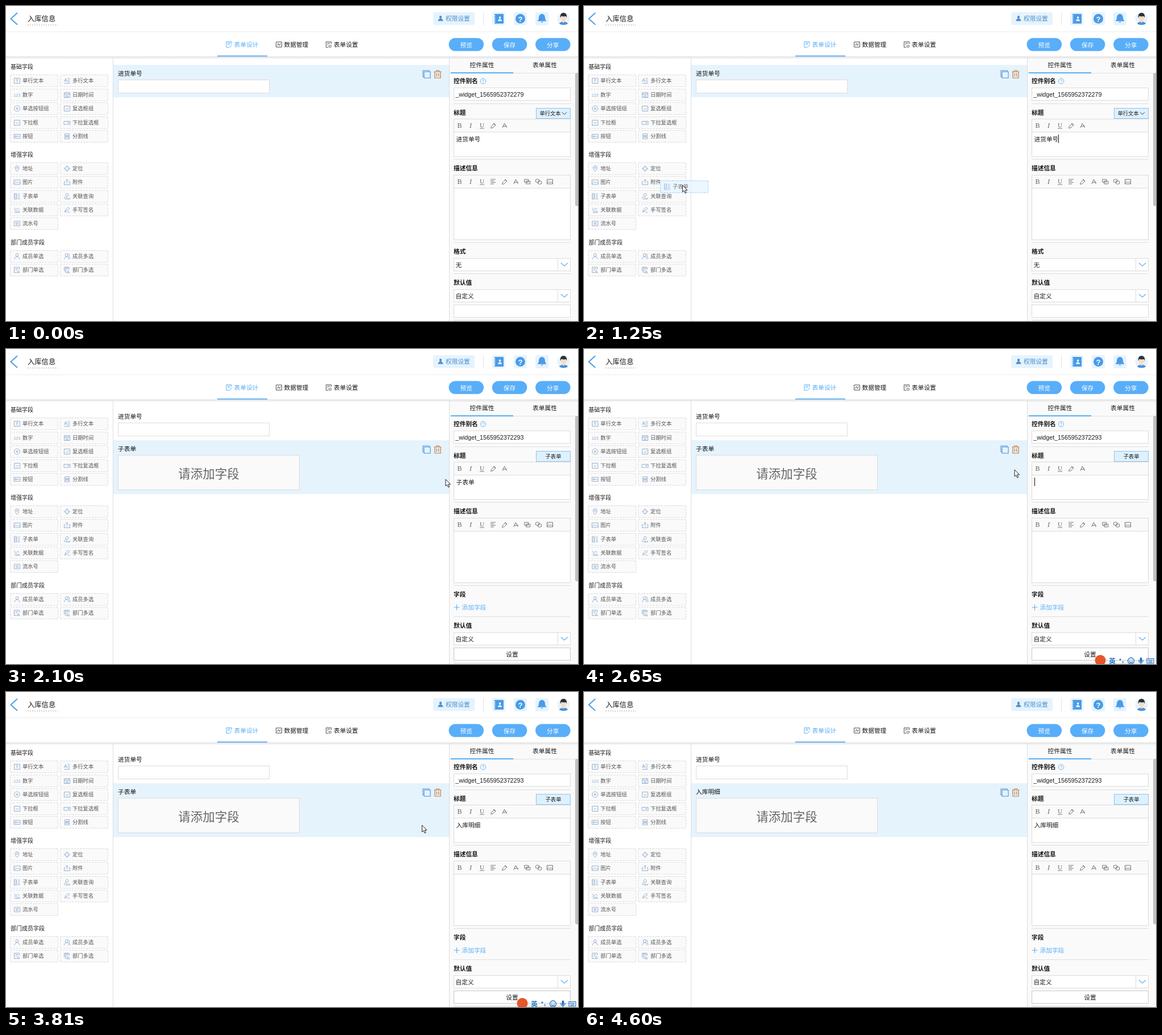
These frames come from a looping animation (1007x556 px, 5.08 s). An HTML page with a canvas:

```html
<!DOCTYPE html>
<html lang="zh-CN">
<head>
<meta charset="utf-8">
<title>表单设计</title>
<style>
html, body { margin: 0; width: 100%; height: 100%; overflow: hidden; background: #fff }
canvas { display: block }
</style>
</head>
<body>
<canvas id="stage" width="1007" height="556"></canvas>
<script>
const c = document.getElementById('stage').getContext('2d');
const LOOP = 5080, TICK = 77.8;
const SANS = '"Liberation Sans","Noto Sans CJK SC","Noto Sans CJK",sans-serif';
const SERIF = '"Liberation Serif",serif';
const BLUE = '#58aef8', PALE = '#e5f3fd', LINE = '#dcdcdc', ICON = '#8aa9cf', DARK = '#1a1a1a';

// Moments of the story, in ticks
const GRAB = 13, DROP = 22, SELECT = 30, TYPE = 34, BLUR = 52, LEAVE = 59;
const POINTER = [[1, 560, 420], [8, 54, 341], [10, 40, 334], [GRAB, 40, 334], [20, 379, 289], [21, 381, 288],
  [27, 774, 230], [SELECT, 828, 235], [33, 758, 213], [47, 758, 213], [54, 629, 324], [58, 602, 392]];

const GROUPS = [
  [107.5, '基础字段', [
    ['单行文本', 'M-5-4.5h10v9h-10zM-2-2h4M0-2v4.5'],
    ['多行文本', 'M-5 2l2.5-6 2.5 6M-4 0h3M1-4h4M1-1h4M1 2h4M-5 4.5h10'],
    ['数字', ''],
    ['日期时间', 'M-5-4h10v8.5h-10zM-5-1.5h10M-2.5-5v2M2.5-5v2M-3 1h6M-3 3h6'],
    ['单选按钮组', 'M-5 0a5 5 0 1 0 10 0a5 5 0 1 0-10 0M-1.5 0a1.5 1.5 0 1 0 3 0a1.5 1.5 0 1 0-3 0M-.5 0h1'],
    ['复选框组', 'M-5-4.5h10v9h-10zM-2.5 0l2 2 3.5-4'],
    ['下拉框', 'M-5-4.5h10v9h-10zM-2.5-1l2.5 2.5 2.5-2.5'],
    ['下拉复选框', 'M-5.5-2.5h11v5.5h-11zM1-.5l1.2 1.5 1.2-1.5z'],
    ['按钮', 'M-5.5-3.5h11v7h-11zM-3.5-1h2v2h-2zM-.5-1v2M1.5-1v2M3.5-1v2'],
    ['分割线', 'M-4-4.5h8v3h-8zM-5 0h10M-4 1.5h8v3h-8z']]],
  [262, '增强字段', [
    ['地址', 'M0 5c-5-5-4-10 0-10s5 5 0 10zM-1.3-1.5a1.3 1.3 0 1 0 2.6 0a1.3 1.3 0 1 0-2.6 0'],
    ['定位', 'M-3.5 0a3.5 3.5 0 1 0 7 0a3.5 3.5 0 1 0-7 0M-5.5 0h3M2.5 0h3M0-5.5v3M0 2.5v3M-.7 0h1.4'],
    ['图片', 'M-5.5-4h11v8h-11zM-5.5 3l3.5-3.5 2 2 2-2 3.5 3M-3-1.8h1'],
    ['附件', 'M-3-1h-2v5.5h10v-5.5h-2M0 2v-7M-2.5-2.5l2.5-2.5 2.5 2.5'],
    ['子表单', 'M-5-5h4v10h-4zM-4-2.5h2M-4 0h2M-4 2.5h2M1-4h4M1-1h4M1 2h4M1 4.5h4'],
    ['关联查询', 'M-2.5-2.5a2.5 2.5 0 1 0 5 0a2.5 2.5 0 1 0-5 0M-5 4c0-4 4-4 5-1s5 2 5-1M-4 4.5h9'],
    ['关联数据', 'M-5-4l3 4 3-3 3 2M-5 0l3 3 3-2M-4 4.5h9M1 2.5h4'],
    ['手写签名', 'M-4 4l1-4 5-5 2.5 2.5-5 4zM-4 4l3-3M0 4.5c2-3 3 2 5-1'],
    ['流水号', 'M-5-4h10v8h-10zM-3-1h5l-1.5-1.5M3 1h-5l1.5 1.5']]],
  [417, '部门成员字段', [
    ['成员单选', 'M-2.3-2.5a2.3 2.5 0 1 0 4.6 0a2.3 2.5 0 1 0-4.6 0M-4.5 5c0-6 9-6 9 0'],
    ['成员多选', 'M-3.3-2.5a2.3 2.5 0 1 0 4.6 0a2.3 2.5 0 1 0-4.6 0M-5 5c0-6 8-6 8 0M1.5-4.5c3 0 3 4 1 4.5q3 1 3 4.5'],
    ['部门单选', 'M4-1v-4h-9v9.5h4M-3-2.5h5M-3 0h3M0 4.5l2-4 2.5 4z'],
    ['部门多选', 'M4-1v-3h-7v8h3M-5 2v-7h8M-1.5-2h4M-1.5 .5h2M0 5l2-4 2.5 4z']]]
];

function box(x, y, w, h, fill, stroke, dash = []) {
  if (fill) { c.fillStyle = fill; c.fillRect(x, y, w, h); }
  if (!stroke) return;
  c.strokeStyle = stroke; c.lineWidth = 1; c.setLineDash(dash);
  c.strokeRect(x + .5, y + .5, w - 1, h - 1);
  c.setLineDash([]);
}
function round(x, y, w, h, r, fill) {
  c.fillStyle = fill; c.beginPath(); c.roundRect(x, y, w, h, r); c.fill();
}
function disc(x, y, r, fill) { round(x - r, y - r, 2 * r, 2 * r, r, fill); }
function text(s, x, y, size = 10.7, color = DARK, style = '', align = 'left', family = SANS) {
  c.font = `${style} ${size}px ${family}`;
  c.fillStyle = color; c.textAlign = align;
  c.fillText(s, x, y + size * .37);
}
const centered = (s, x, y, size, color, style, family) => text(s, x, y, size, color, style, 'center', family);
function path(d, x, y, stroke, width = .9, fill) {
  const p = new Path2D(d);
  c.save(); c.translate(x, y);
  if (fill) { c.fillStyle = fill; c.fill(p); }
  if (stroke) { c.strokeStyle = stroke; c.lineWidth = width; c.stroke(p); }
  c.restore();
}

function avatar(x, y) {
  disc(x, y, 11, PALE);
  path('M-7.5 9c1-5 14-5 15 0q-7.500 4-15 0z', x, y, 0, 0, '#4a90d8');
  path('M-1.500 2h3v4l-1.500 1.500-1.500-1.500z', x, y, 0, 0, '#f6d2b4');
  disc(x, y - .5, 4.7, '#fbdcc2');
  path('M-5.500 0c-2.500-12 13.500-12 11 0l-1.200-3q-4.800 1-8-.5z', x, y - 1.5, 0, 0, '#2b2f38');
}

function header() {
  box(0, 45, 1007, 1, '#ececec');
  const shade = c.createLinearGradient(0, 88, 0, 94);
  shade.addColorStop(0, '#d9d9d9'); shade.addColorStop(1, '#d9d9d900');
  box(0, 89, 1007, 5, shade);

  path('M20 12L8.5 22.5 20 33', 0, 0, '#4a9fea', 2);
  text('入库信息', 38, 22.5, 12.3);
  c.setLineDash([2, 2]); path('M38 33.5h53', 0, 0, '#aaa', 1); c.setLineDash([]);

  round(752, 11, 73, 22.5, 3, PALE);
  path('M-2.2-2.5a2.2 2.5 0 1 0 4.4 0a2.2 2.5 0 1 0-4.4 0M-4.5 4.5c0-6 9-6 9 0z', 765, 22, 0, 0, '#4a90d0');
  text('权限设置', 774, 22.2, 10.7, '#4b8fcb');
  box(840, 11, 1, 23, '#e2e2e2');

  for (const x of [856, 894, 932]) round(x, 11, 23, 23, 3, PALE);
  round(860, 14, 16, 17, 1, '#4a9be8');
  path('M-6-5h3M-6-1.5h3M-6 2h3M-6 5.5h3', 865, 22.5, '#fff', 1);
  path('M-1.7-2a1.7 2 0 1 0 3.4 0a1.7 2 0 1 0-3.4 0M-3.5 4c0-4.5 7-4.5 7 0z', 869.5, 22.5, 0, 0, '#fff');
  disc(905.5, 22.5, 8.5, '#4a9be8');
  centered('?', 905.5, 22.7, 13, '#fff', 'bold');
  path('M-8 5q2.5-2 2.5-6c0-9 11-9 11 0q0 4 2.5 6zM-2 6h4q-2 3.5-4 0', 943.5, 21.8, 0, 0, '#4a9be8');
  avatar(981.5, 22.5);

  const tabs = [[387, '表单设计', BLUE], [475, '数据管理', DARK], [562.5, '表单设置', DARK]];
  const marks = ['M4.5-1v-4h-9v10h5M-2.5-2.5h5M-2.5 0h4M1 5l4-4.5', 'M-5-4.5h10v9h-10zM-3 2l2-4 2 4 2-4',
    'M4.5-1v-4h-9v10h4M-2.5-2.5h5M-2.5 0h2M.5 3a2 2 0 1 0 4 0a2 2 0 1 0-4 0'];
  tabs.forEach(([x, label, color], i) => {
    path(marks[i], x + 5.5, 68, i ? '#555' : BLUE, 1);
    text(label, x + 14.5, 68.3, 10.7, color);
  });
  box(372, 87.4, 88, 1.8, BLUE);
  ['预览', '保存', '分享'].forEach((label, i) => {
    const x = 779.5 + i * 76.3;
    round(x, 56.5, 61.5, 23, 11.5, BLUE);
    centered(label, x + 30.7, 68.7, 10.7, '#fff');
  });
}

function field([label, icon], x, y, active) {
  box(x, y, 85, 22, active ? '#e8f5ff' : '#fafafa', active ? '#84c6f2' : '#d6d6d6', [3, 2]);
  if (icon) path(icon, x + 12.5, y + 11, ICON);
  else centered('123', x + 12.5, y + 11, 7, ICON);
  text(label, x + 22, y + 11, 9.3, '#555');
}

function sidebar(pointer, t) {
  box(188, 91, 1, 465, '#dedede');
  for (const [top, title, items] of GROUPS) {
    text(title, 8, top, 10);
    items.forEach((item, i) => {
      const x = i % 2 ? 95 : 7, y = Math.round(top + 13.8 + (i >> 1) * 24.4);
      const over = pointer && t <= GRAB && pointer.x > x && pointer.x < x + 85 && pointer.y > y && pointer.y < y + 22;
      field(item, x, y, over);
    });
  }
}

function rowTools(y) {
  path('M-6.5 4.500v-11h11v2M-4.500-4.500h11v11h-11v-2h-2M-4.500-4.500v9', 740.5, y, '#4a90d8', 1.1);
  path('M-6.5-4.5h13M-2.5-4.5v-2h5v2M-5-4.5v11h10v-11M-1.7-2v6M1.7-2v6', 760, y, '#c77a3c', 1.2);
}

function form(t, title) {
  const added = t >= DROP;
  box(189, added ? 161 : 104, 591, added ? 95 : 57, PALE);
  text('进货单号', 197, 119, 10.7, '#111', '500');
  box(197, 130, 267, 24, '#fff', LINE);
  rowTools(added ? 177.5 : 120.5);
  if (added) {
    text(title, 197, 176, 10.7, '#111', '500');
    box(197, 187, 320, 62, '#fafafa', LINE);
    centered('请添加字段', 357, 220, 21.5, '#666');
  }
}

function select(y, label) {
  box(788, y, 206, 23, '#fff', LINE);
  box(971, y, 1, 23, LINE);
  path('M-6-3l6 5.500 6-5.500', 983, y + 11.5, BLUE, 1.1);
  text(label, 791.5, y + 11.7);
}

function editor(y, h, full) {
  box(788, y, 206, h, '#fff', LINE);
  box(788, y, 206, 24, '#fafafa', LINE);
  const m = y + 12, gray = '#666';
  centered('B', 798.5, m, 12, gray, '', SERIF);
  centered('I', 818, m, 12, gray, 'italic', SERIF);
  centered('U', 838, m - 1, 11, gray, '', SERIF);
  path('M-4 5h8', 838, m, gray);
  const pen = 'M-4.5 4.5l1-3 5-5 2.5 2.5-5 5zM0-4l4 4', letter = 'M-4 4l3.5-8 4 8M-3 1.5h4M1-1l3 3';
  const marks = full ? ['M-5-4h9M-5-1.3h6M-5 1.3h9M-5 4h6', pen, letter,
    'M-5-4h7v5h-7zM-2-1h7v5h-7z', 'M-5-3.5q3-2 6 0v4q-3 2-6 0zM-1-.5q3-2 6 0v4q-3 2-6 0z',
    'M-5-4h10v8h-10zM-5 3l3-3 2 2 2-2 3 3M-3-2h1'] : [pen, letter];
  marks.forEach((d, i) => path(d, 858 + i * 19.9, m, gray));
}

function panel(t, title, caret, pointer) {
  const added = t >= DROP;
  box(780, 91, 227, 465, '#fafafa');
  box(780, 91, 1, 465, LINE);
  box(781, 118, 226, 1, '#e0e0e0');
  box(783, 117, 110, 2, BLUE);
  centered('控件属性', 838, 104.3);
  centered('表单属性', 948.5, 104.3);
  round(1002, 118, 6, added ? 292 : 235, 3, '#c1c1c1');
  for (const y of [172, 270, 417, 472, 554]) box(788, y, 206, 1, '#dedede');
  const heads = [[132.5, '控件别名'], [188, '标题'], [286, '描述信息'], [433.5, added ? '字段' : '格式'], [488.5, '默认值']];
  for (const [y, label] of heads) text(label, 788, y, 10.7, '#111', 'bold');

  path('M-4.7 0a4.7 4.7 0 1 0 9.4 0a4.7 4.7 0 1 0-9.4 0', 840, 132.5, BLUE);
  centered('?', 840, 132.7, 7.5, BLUE);
  box(788, 144, 206, 23, '#fff', LINE);
  text('_widget_15659523722' + (added ? '93' : '79'), 791.3, 156);

  box(933, 180, 61, 19, '#def1fe', '#8fc4ea');
  centered(added ? '子表单' : '单行文本', added ? 963.5 : 958, 189.5, 9.3);
  if (!added) path('M-4-2l4 4 4-4', 983, 189.5, '#333', 1);

  editor(199, 67);
  if (t >= SELECT && t < TYPE) {
    const from = Math.min(825, Math.max(792.5, pointer.x));
    box(from, 228, 825 - from, 15, '#a8d1ff');
  }
  text(title, 792.5, 235.3);
  if (caret) box(Math.round(792.5 + title.length * 10.7), 227, 1, 15, '#111');
  editor(298, 115, true);

  if (added) {
    path('M-5 0h10M0-5v10', 793.5, 456, BLUE, 1.1);
    text('添加字段', 802.5, 456.3, 10.7, BLUE);
  } else select(445, '无');
  select(500, '自定义');
  box(788, 527, 206, 23, '#fff', added ? '#c8c8c8' : LINE);
  if (added) centered('设置', 891, 539);
}

function inputBar() {
  disc(909, 549.5, 9.5, '#e8552a');
  const ink = '#1f74c8';
  centered('英', 930, 550.5, 11.5, ink, 'bold');
  disc(944, 548, 1.5, ink);
  text(',', 947, 549, 12, ink, 'bold');
  path('M-5.5 0a5.5 5.5 0 1 0 11 0a5.5 5.5 0 1 0-11 0M-3 1q3 4 6 0M-2-2.5v1.5M2-2.5v1.5', 963, 550.5, ink, 1.3);
  path('M-4-1c0 6 8 6 8 0M0 3.5v3', 980.5, 550, ink, 1.3);
  round(978.5, 544.5, 4, 8, 2, ink);
  path('M-6-4h12v8h-12zM-4-1.5h8M-4 .5h8M-3 2.5h6', 997, 550.5, ink, 1.2);
}

function pointerAt(t) {
  if (t < 1 || t >= LEAVE) return null;
  const i = POINTER.findIndex(k => k[0] > t);
  if (i < 0) return { x: POINTER.at(-1)[1], y: POINTER.at(-1)[2] };
  const [t0, x0, y0] = POINTER[i - 1], [t1, x1, y1] = POINTER[i];
  const u = (t - t0) / (t1 - t0), e = u * u * (3 - 2 * u);
  return { x: x0 + (x1 - x0) * e, y: y0 + (y1 - y0) * e };
}

function drawPointer({ x, y }, t) {
  if (t < GRAB && x < 92)
    path('M0-9l3 3.5h-2v4.5h4.5v-2l3.5 3-3.5 3v-2h-4.5v4.5h2l-3 3.5-3-3.5h2v-4.5h-4.5v2l-3.5-3 3.5-3v2h4.5v-4.5h-2z', x, y, '#222', 1, '#fff');
  else if (x > 788 && t >= DROP && t < 47)
    path('M-3-7q3 0 3 2q0-2 3-2M0-5v10M-3 7q3 0 3-2q0 2 3 2', x, y, '#222', 1);
  else path('M0 0v12l2.7-2.5 2 4.5 2-.9-2-4.3h3.8z', x, y, '#222', 1, '#fff');
}

function draw(t) {
  const pointer = pointerAt(t), typed = '入库明细';
  const title = t < DROP ? '进货单号' : t < TYPE ? '子表单' : typed.slice(0, t - TYPE);
  const caret = t >= 16 && t < DROP || t >= TYPE && t < 38 || t >= 42 && t < 47;
  box(0, 0, 1007, 556, '#fff');
  sidebar(pointer, t);
  form(t, t < BLUR ? '子表单' : typed);
  panel(t, title, caret, pointer);
  header();
  if (t > GRAB && t < DROP) {
    if (pointer.x > 230) box(189, 161, 591, 25, '#fff', '#d8d8d8', [3, 2]);
    c.globalAlpha = .8;
    field(GROUPS[1][2][4], Math.round(pointer.x - 39), Math.round(pointer.y - 8), true);
    c.globalAlpha = 1;
  }
  if (t >= TYPE && t < BLUR) inputBar();
  if (pointer) drawPointer(pointer, t);
}

function frame() {
  draw(Math.floor((performance.now() % LOOP + 10) / TICK));
  requestAnimationFrame(frame);
}
frame();
</script>
</body>
</html>
```
